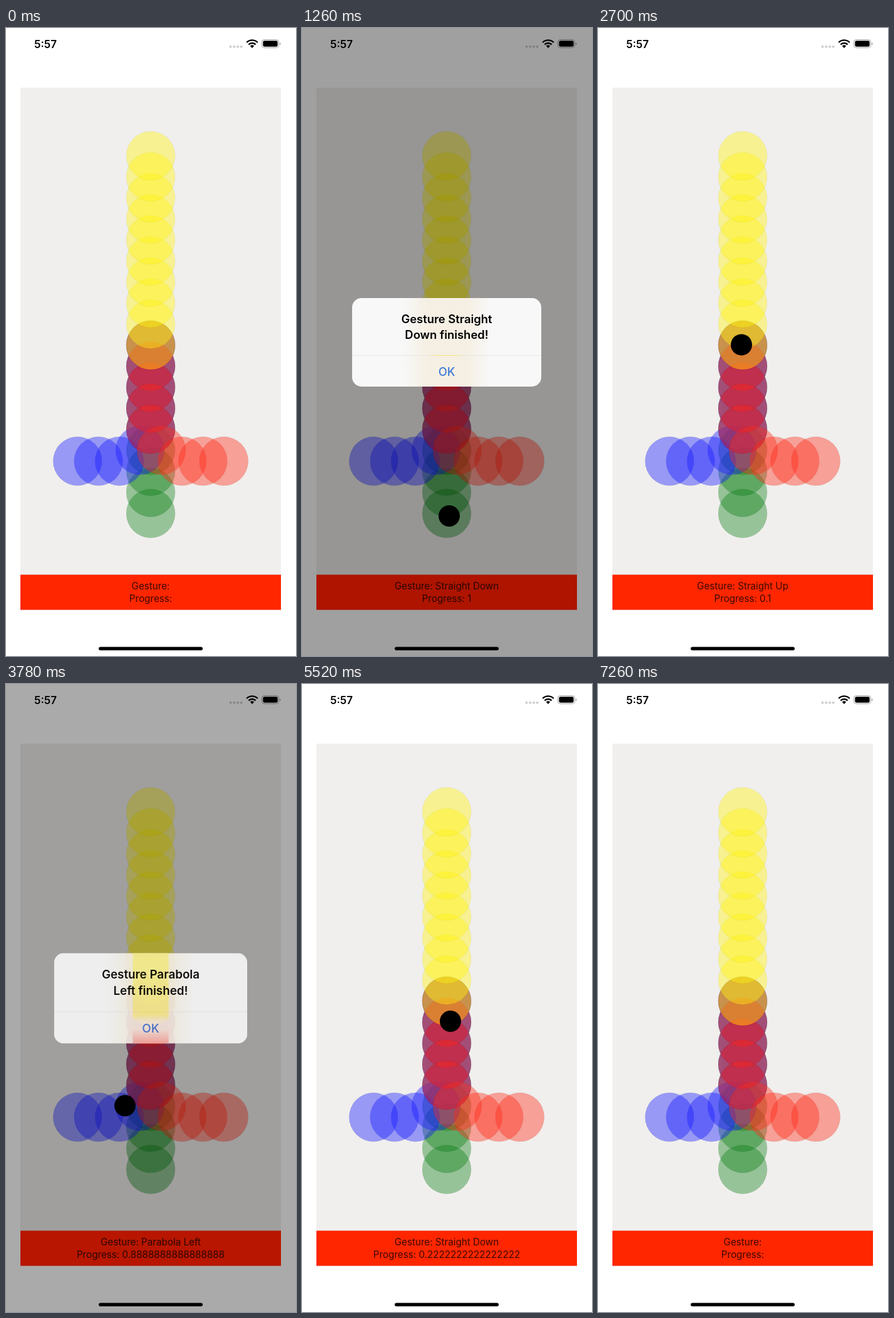
Recreate the animation shown at these times as an HTML page. Size 463x1000 px, loop 8 s.

```html
<!DOCTYPE html>
<html lang="en">
<head>
<meta charset="utf-8">
<title>Gesture demo</title>
<style>
  html, body { margin: 0; width: 100%; height: 100%; overflow: hidden; background: #fff; }
  body { position: relative; font-family: Inter, "Liberation Sans", sans-serif; }
  svg { position: absolute; left: 0; top: 0; display: block; background: #fff; }
  svg text { font-family: inherit; }
  #alert {
    position: absolute; left: 80px; top: 430px; width: 302px; height: 141px;
    border-radius: 15px; overflow: hidden; opacity: 0; text-align: center;
    background:
      linear-gradient(90deg, transparent 27%, rgba(244, 234, 214, .6) 39%, rgba(244, 234, 214, .6) 61%, transparent 73%),
      #f8f8f8;
  }
  #alert div { position: absolute; left: 0; width: 100%; white-space: nowrap; }
  #alert #tint {
    left: 123px; width: 56px; top: 0; height: 100%;
    background: linear-gradient(#f9f094 68%, rgba(249, 240, 148, 0) 76%, rgba(250, 170, 160, 0) 84%, #faaaa0);
  }
  #title { top: 21px; font-size: 18.4px; font-weight: 600; line-height: 24.5px; color: #000; }
  #rule {
    top: 91px; height: 1px;
    background: linear-gradient(90deg, #e6e6e4 40%, #efe27c 45%, #efe27c 55%, #e6e6e4 60%);
  }
  #ok { top: 105px; font-size: 18.4px; font-weight: 500; line-height: 24px; color: #3f7ad6; }
</style>
</head>
<body>
<svg id="screen" width="463" height="1000" viewBox="0 0 463 1000">
  <text x="45" y="31.5" font-size="17" font-weight="600">5:57</text>
  <g fill="#cdcdcd">
    <circle cx="358.5" cy="29.7" r="2"/><circle cx="364.2" cy="29.7" r="2"/>
    <circle cx="369.9" cy="29.7" r="2"/><circle cx="375.6" cy="29.7" r="2"/>
  </g>
  <path d="M393 32l-3.2-3.4a4.6 4.6 0 0 1 6.4 0z"/>
  <g fill="none" stroke="#000" stroke-width="2.4">
    <path d="M387.4 26.4a7.9 7.9 0 0 1 11.2 0"/>
    <path d="M384.2 23a12.5 12.5 0 0 1 17.6 0"/>
  </g>
  <rect x="408.5" y="18.5" width="27" height="13" rx="4" fill="none" stroke="#a0a0a0"/>
  <rect x="410.3" y="20.3" width="23.4" height="9.4" rx="2.4"/>
  <path d="M437 23v4q1.6-.5 1.6-2t-1.6-2z" fill="#a0a0a0"/>

  <rect x="23" y="95" width="416" height="832" fill="#f0efed"/>
  <g id="spots" stroke="#000" stroke-opacity=".08" stroke-width=".5"></g>
  <rect x="23" y="870.5" width="416" height="56" fill="#ff2600"/>
  <g font-size="15.2" text-anchor="middle" fill="#3a0a00">
    <text id="gesture" x="231" y="894"></text>
    <text id="progress" x="231" y="913.5"></text>
  </g>
  <circle id="dot" r="17"/>
  <rect x="148" y="985.5" width="166" height="5.5" rx="2.75"/>
</svg>
<div id="alert">
  <div id="tint"></div>
  <div id="title"></div>
  <div id="rule"></div>
  <div id="ok">OK</div>
</div>

<script>
const LOOP = 8000, STEP = 60, GAP = 33.5, CX = 231, START_Y = 505;
const APPEAR = 400, FADE = 340, DIM = 0.373, VIVID = 0.13;
const $ = id => document.getElementById(id);

// Overlapping translucent spots along each gesture path
function spot(x, y, color, alpha) {
  const c = document.createElementNS("http://www.w3.org/2000/svg", "circle");
  const attrs = { cx: x, cy: y, r: 39, fill: color, "fill-opacity": alpha };
  for (const k in attrs) c.setAttribute(k, attrs[k]);
  $("spots").append(c);
}

function curve(color, side, trunkAlpha) {
  for (let i = 0; i < 5; i++) spot(CX, START_Y + i * GAP, color, trunkAlpha);
  spot(CX + side * 17, 672.5, color, 0.4);
  for (let i = 0; i < 3; i++) spot(CX + side * (50 + i * 33.4), 689.7, color, 0.4);
}

for (let i = 0; i < 9; i++) spot(CX, START_Y + i * GAP, "#087c14", 0.39);
curve("#1418ff", -1, 0.5);
curve("#ff2a14", 1, 0.46);
for (let i = 0; i < 10; i++) spot(CX, START_Y - i * GAP, "#fff210", 0.41);

// path: [time, x, y]; show and hide: when the alert starts to appear and to fade
const drags = [
  { name: "Straight Down", title: ["Gesture Straight", "Down finished!"], show: 780, hide: 1850,
    path: [[120, 231, 503], [300, 233, 560], [540, 234, 690], [720, 235, 777]] },
  { name: "Parabola Left", title: ["Gesture Parabola", "Left finished!"], show: 3570, hide: 4460,
    path: [[2690, 229, 503], [2900, 229, 532], [3200, 226, 598], [3400, 214, 646], [3540, 190, 671.5]] },
  { name: "Parabola Right", title: ["Gesture Parabola", "Right finished!"], show: 6120, hide: 6860,
    path: [[5260, 232, 503], [5520, 237, 537], [5780, 236, 600], [5960, 248, 648], [6080, 277.4, 679.4]] }
];

const clamp = v => Math.min(1, Math.max(0, v));
const easeOut = p => 1 - (1 - p) ** 3;

function along(path, t) {
  let i = 0;
  while (i < path.length - 2 && t > path[i + 1][0]) i++;
  const [t0, x0, y0] = path[i], [t1, x1, y1] = path[i + 1];
  const p = clamp((t - t0) / (t1 - t0));
  return [x0 + (x1 - x0) * p, y0 + (y1 - y0) * p];
}

// Best matching gesture and the share of its spots already passed
function match(name, x, y) {
  const n = 1 + Math.round((y - START_Y) / GAP) + Math.round(Math.abs(x - CX) / 20);
  if (n < 2) return ["Straight Up", 0.1];
  return [n <= 5 ? "Straight Down" : name, Math.min(n, 9) / 9];
}

function setText(el, text) {
  if (el.textContent !== text) el.textContent = text;
}

function draw(t) {
  const d = drags.find(g => t >= g.path[0][0] && t < g.hide + FADE);
  let label = "", value = "", shown = 0, scale = 1;
  $("dot").style.display = d ? "" : "none";
  if (d) {
    const [x, y] = along(d.path, t);
    $("dot").setAttribute("cx", x);
    $("dot").setAttribute("cy", y);
    const [name, share] = match(d.name, x, y);
    label = " " + name;
    value = " " + share;
    const p = clamp((t - d.show) / APPEAR), grow = easeOut(p);
    shown = grow * (1 - clamp((t - d.hide) / FADE));
    scale = 1.2 - 0.2 * grow;
    $("title").innerHTML = d.title.join("<br>");
    // The backdrop shows through until its blur settles
    $("tint").style.opacity = clamp(2 - 2 * p);
  }
  setText($("gesture"), "Gesture:" + label);
  setText($("progress"), "Progress:" + value);
  $("screen").style.filter = shown
    ? `brightness(${1 - shown * DIM}) saturate(${1 + shown * VIVID})` : "none";
  $("alert").style.opacity = shown;
  $("alert").style.transform = `scale(${scale})`;
}

const begin = performance.now();
function tick() {
  const t = Math.max(0, performance.now() - begin) % LOOP;
  draw(Math.floor(t / STEP) * STEP);
  requestAnimationFrame(tick);
}
tick();
</script>
</body>
</html>
```
